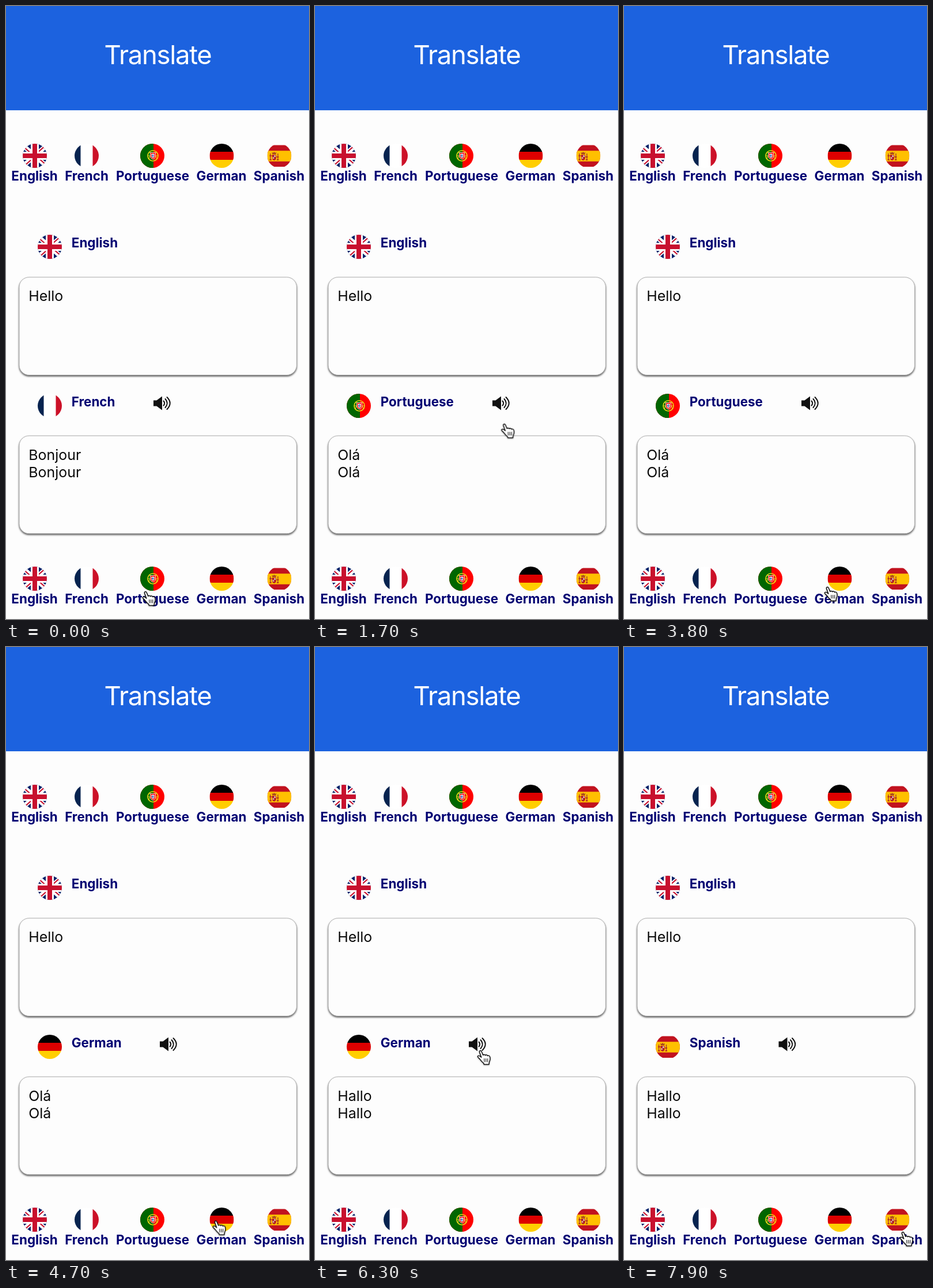
An HTML page for the animation above (8 s loop, 526x1064 px).

```html
<!DOCTYPE html>
<html lang="en">
<head>
<meta charset="utf-8">
<title>Translate</title>
<style>
  html, body { margin: 0; width: 100%; height: 100%; overflow: hidden; background: #fdfdfd; }
  svg { display: block; width: 100%; height: 100%; }
  text { font-family: Inter, Roboto, sans-serif; font-optical-sizing: none; }
  .title { font-size: 45.5px; letter-spacing: -1.3px; fill: #fff; text-anchor: middle; }
  .label { font-size: 22.4px; font-weight: 700; fill: #000072; }
  .row { text-anchor: middle; }
  .body { font-size: 24.9px; fill: #0a0a0a; }
  .card { fill: #fdfdfd; stroke: #b0b0b0; filter: drop-shadow(0 2px 1.5px rgba(0, 0, 0, .65)); }

  .lang, .said { animation: 8s step-end infinite; }
  .fr { animation-name: fr; }
  .pt { animation-name: pt; }
  .de { animation-name: de; }
  .es { animation-name: es; }
  .bonjour { animation-name: bonjour; }
  .ola { animation-name: ola; }
  .hallo { animation-name: hallo; }
  #hand { animation: hand 8s ease-in-out infinite; }

  /* chosen language */
  @keyframes fr { 0% { opacity: 1 } 7.5%, 100% { opacity: 0 } }
  @keyframes pt { 0% { opacity: 0 } 7.5% { opacity: 1 } 58.75%, 100% { opacity: 0 } }
  @keyframes de { 0% { opacity: 0 } 58.75% { opacity: 1 } 95%, 100% { opacity: 0 } }
  @keyframes es { 0% { opacity: 0 } 95%, 100% { opacity: 1 } }

  /* translated text follows a moment later */
  @keyframes bonjour { 0% { opacity: 1 } 17.5%, 100% { opacity: 0 } }
  @keyframes ola { 0% { opacity: 0 } 17.5% { opacity: 1 } 66.25%, 100% { opacity: 0 } }
  @keyframes hallo { 0% { opacity: 0 } 66.25%, 100% { opacity: 1 } }

  @keyframes hand {
    0% { transform: translate(236px, 1015px) }
    2.5%, 3.75% { transform: translate(242px, 1006px) }
    5%, 12.5% { transform: translate(246px, 1002px) }
    23.75%, 25% { transform: translate(331px, 693px) }
    26.25%, 41.25% { transform: translate(329px, 690px) }
    47.5% { transform: translate(347px, 1007px) }
    52.5% { transform: translate(358px, 1000px) }
    57.5% { transform: translate(358px, 1000px); animation-timing-function: ease-in }
    62.5% { transform: translate(357px, 943px); animation-timing-function: ease-out }
    68.75%, 70% { transform: translate(281px, 706px) }
    71.25%, 82.5% { transform: translate(281px, 699px) }
    91.25%, 100% { transform: translate(478px, 1014px) }
  }
</style>
</head>
<body>
<svg viewBox="0 0 526 1064" preserveAspectRatio="none">
  <defs>
    <clipPath id="disc"><circle r="21"/></clipPath>
    <clipPath id="band"><rect x="-21" y="-18.5" width="42" height="37.5"/></clipPath>

    <g id="flag-en" clip-path="url(#disc)">
      <path fill="#012169" d="M-21-21h42v42h-42z"/>
      <path stroke="#fff" stroke-width="8" d="M-24-21l48 42M-24 21l48-42"/>
      <path stroke="#c8102e" stroke-width="2.2" d="M-24-19.5L0 1.5M24 19.5L0-1.5M-24 22.5L0 1.5M24-22.5L0-1.5"/>
      <path stroke="#fff" stroke-width="14" d="M0-21v42M-21 0h42"/>
      <path stroke="#c8102e" stroke-width="8" d="M0-21v42M-21 0h42"/>
    </g>
    <g id="flag-fr" clip-path="url(#disc)">
      <path fill="#fff" d="M-21-21h42v42h-42z"/>
      <path fill="#06234f" d="M-21-21h10.5v42h-10.5z"/>
      <path fill="#cc1128" d="M10.5-21h10.5v42h-10.5z"/>
    </g>
    <g id="flag-pt" clip-path="url(#disc)">
      <path fill="#f00" d="M-21-21h42v42h-42z"/>
      <path fill="#060" d="M-21-21h23v42h-23z"/>
      <g transform="translate(1)">
        <circle r="9" fill="none" stroke="#e8d81a" stroke-width="1.6"/>
        <path fill="none" stroke="#e8d81a" d="M-9 0h18M-6-6Q6-3 7 6M6-6Q-6-3-7 6"/>
        <path fill="#f00" stroke="#fff" stroke-width=".8" d="M-4.5-5.5h9v6q0 4-4.5 5.5q-4.5-1.5-4.5-5.5z"/>
        <path fill="#fff" d="M-2.6-3.5h5.2v4.5q0 2-2.6 3q-2.6-1-2.6-3z"/>
        <path stroke="#039" stroke-width="1.3" stroke-dasharray="1.6 .6" d="M0-3v6M-2.2 0h4.4"/>
      </g>
    </g>
    <g id="flag-de" clip-path="url(#disc)">
      <path fill="#000" d="M-21-21h42v14h-42z"/>
      <path fill="#d00" d="M-21-7h42v14h-42z"/>
      <path fill="#ffce00" d="M-21 7h42v14h-42z"/>
    </g>
    <g id="flag-es" clip-path="url(#band)">
      <g clip-path="url(#disc)">
        <path fill="#c1121f" d="M-21-21h42v42h-42z"/>
        <path fill="#ffc000" d="M-21-8.8h42v18.6h-42z"/>
        <path stroke="#a8432c" stroke-width="1.5" d="M-15.5-4v11M-2.5-4v11"/>
        <path stroke="#b01c20" stroke-width="1.6" d="M-17 0h4M-5 2h4M-17 7h3.5M-4.5 7h3.5"/>
        <path fill="#b5202a" d="M-12.5-2h7v6q0 3-3.5 4q-3.5-1-3.5-4z"/>
        <path fill="#d9c9b0" d="M-9-1h2.6v3h-2.6zM-11.8 2.5h2.6v2.5h-2.6z"/>
        <path fill="#a03a20" d="M-12-3l-1-3 2.5 1 1.5-2 1.5 2 2.5-1-1 3z"/>
      </g>
    </g>

    <g id="speaker">
      <path fill="#111" d="M0-5h5.5l9.5-7v24l-9.5-7H0z"/>
      <path fill="none" stroke="#111" stroke-width="2" stroke-linecap="round"
        d="M17.5-4q3.4 4 0 8M20.5-7.5q6.6 7.5 0 15M23.5-10.5q10.4 10.5 0 21"/>
    </g>

    <g id="picker" class="label row">
      <use href="#flag-en" x="50"/><text x="49.5" y="43">English</text>
      <use href="#flag-fr" x="140"/><text x="140" y="43">French</text>
      <use href="#flag-pt" x="254"/><text x="254.5" y="43">Portuguese</text>
      <use href="#flag-de" x="374.5"/><text x="374" y="43">German</text>
      <use href="#flag-es" x="474.5"/><text x="474" y="43">Spanish</text>
    </g>
  </defs>

  <rect width="526" height="1064" fill="#fdfdfd"/>
  <rect width="526" height="181" fill="#1c62df"/>
  <text class="title" x="263.5" y="100.5">Translate</text>

  <use href="#picker" y="260"/>
  <use href="#picker" y="994"/>

  <use href="#flag-en" x="76" y="418"/>
  <text class="label" x="113.8" y="419">English</text>
  <rect class="card" x="23" y="470.8" width="481.5" height="169.7" rx="17"/>
  <text class="body" x="39.3" y="512">Hello</text>

  <g class="lang fr">
    <use href="#flag-fr" x="76" y="694"/>
    <text class="label" x="113.8" y="695">French</text>
    <use href="#speaker" x="256" y="689.5"/>
  </g>
  <g class="lang pt">
    <use href="#flag-pt" x="76" y="694"/>
    <text class="label" x="113.8" y="695">Portuguese</text>
    <use href="#speaker" x="308" y="689.5"/>
  </g>
  <g class="lang de">
    <use href="#flag-de" x="76" y="694"/>
    <text class="label" x="113.8" y="695">German</text>
    <use href="#speaker" x="267" y="689.5"/>
  </g>
  <g class="lang es">
    <use href="#flag-es" x="76" y="694"/>
    <text class="label" x="113.8" y="695">Spanish</text>
    <use href="#speaker" x="268.5" y="689.5"/>
  </g>

  <rect class="card" x="23" y="746" width="481.5" height="169.7" rx="17"/>
  <g class="body">
    <text class="said bonjour"><tspan x="39.3" y="787.7">Bonjour</tspan><tspan x="39.3" y="818">Bonjour</tspan></text>
    <text class="said ola"><tspan x="39.3" y="787.7">Olá</tspan><tspan x="39.3" y="818">Olá</tspan></text>
    <text class="said hallo"><tspan x="39.3" y="787.7">Hallo</tspan><tspan x="39.3" y="818">Hallo</tspan></text>
  </g>

  <g id="hand">
    <g stroke="#111" stroke-width="1.5" stroke-linejoin="round" stroke-linecap="round"
       style="filter: drop-shadow(0 1px 1px rgba(0, 0, 0, .35))">
      <path fill="#fff" d="M4.6 4.2C3.6 1.6 7 .6 8 3L10.8 9.4C11.4 8 14 8 14.6 9.8C15.6 8.6 18 8.9 18.4 10.6C19.8 9.7 22.2 10.3 22.6 12.4C23.4 15 23.4 17 22 20C21.4 21.4 21.2 22.6 21 25.4L12.4 25.4L11.8 23.6C10 21.8 7.4 19.6 6 17.4C4.8 15.6 2.6 14 1.6 12.6C.6 11 3 9.6 5 11L7.8 13.2Z"/>
      <path fill="none" stroke-width="1.1" d="M12.8 15.5l.2 5.5M15.8 15.5l.1 5.5M18.8 15.5l-.1 5.5"/>
    </g>
  </g>
</svg>
</body>
</html>
```
